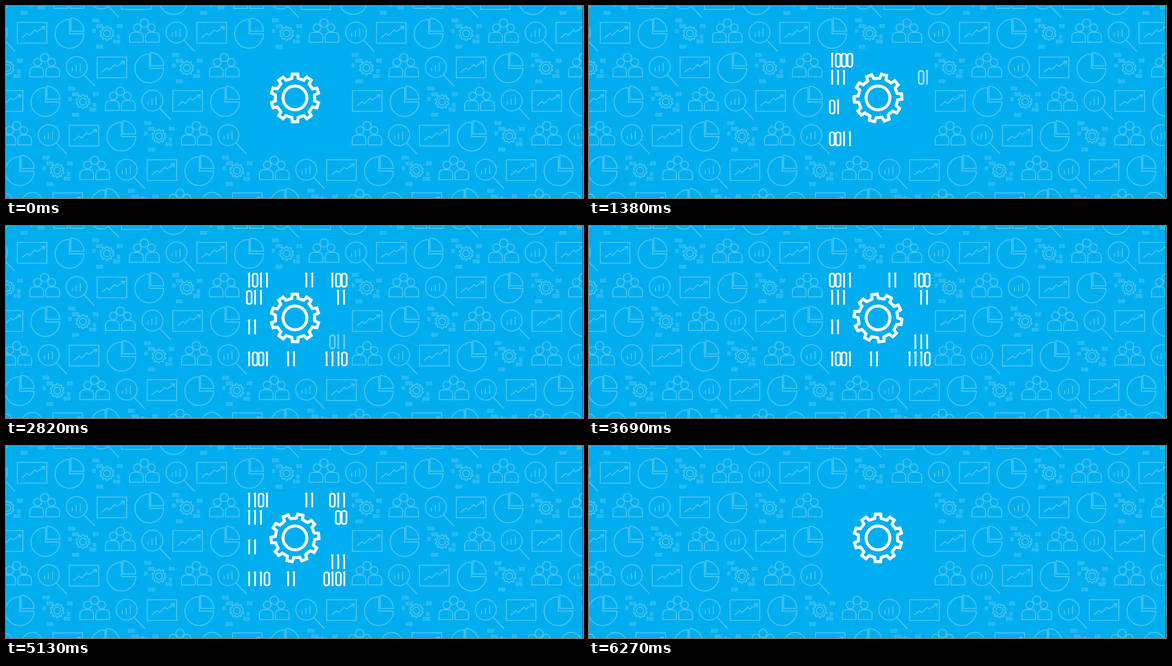
An HTML page with a canvas that plays this animation: 1200 by 400 pixels, repeating every 6300 ms.

```html
<!DOCTYPE html>
<html lang="en">
<head>
<meta charset="utf-8">
<title>Data gear</title>
<style>
html, body { margin: 0; width: 100%; height: 100%; overflow: hidden; background: #00aeef; }
canvas { display: block; }
</style>
</head>
<body>
<canvas id="stage" width="1200" height="400"></canvas>
<script>
const LOOP = 6300, STEP = 30;
const PERIOD = 373.5;
const stage = document.getElementById('stage');
const backdrop = document.createElement('canvas');
backdrop.width = 1200;
backdrop.height = 400;
let g = backdrop.getContext('2d');

function line(...pts) {
  g.beginPath();
  for (let i = 0; i < pts.length; i += 2) g.lineTo(pts[i], pts[i + 1]);
  g.stroke();
}

function circle(x, y, r) {
  g.beginPath();
  g.arc(x, y, r, 0, 2 * Math.PI);
  g.stroke();
}

// Ten tapered teeth around a ring; k scales the shape
function gear(x, y, k, width, turn) {
  g.save();
  g.translate(x, y);
  g.rotate(turn);
  g.lineWidth = width;
  g.beginPath();
  for (let i = 0; i < 10; i++) {
    for (const [a, r] of [[-9.4, 41.2], [-6.4, 50], [6.4, 50], [9.4, 41.2]]) {
      const angle = (i * 36 + a - 90) * Math.PI / 180;
      g.lineTo(r * k * Math.cos(angle), r * k * Math.sin(angle));
    }
  }
  g.closePath();
  g.stroke();
  circle(0, 0, 24.8 * k);
  g.restore();
}

// Binary digits: (x, y) is the top left corner
function digits(word, x, y, k = 1, pitch = 12.3, width = 3.5) {
  g.save();
  g.translate(x, y);
  g.scale(k, k);
  g.lineWidth = width;
  [...word].forEach((d, i) => {
    const c = 6.8 + i * pitch;
    if (d === '0') {
      g.beginPath();
      g.roundRect(c - 5, 1.8, 10, 27.2, 4.2);
      g.stroke();
    } else {
      line(c - 2.6, 2.6, c, 1.6, c, 30.6);
    }
  });
  g.restore();
}

function chart() {
  g.strokeRect(23.5, 34.3, 61.5, 43.2);
  line(33, 66, 44, 57, 49, 61, 60, 50, 64.5, 53.5, 80, 43.5);
  line(73, 43.5, 80.5, 43, 79, 50);
}

function pie() {
  g.beginPath();
  g.arc(132, 58, 30, 0, 1.5 * Math.PI);
  g.lineTo(132, 58);
  g.closePath();
  g.stroke();
  g.beginPath();
  g.moveTo(134.8, 52.5);
  g.arc(134.8, 52.5, 27.2, -Math.PI / 2, 0);
  g.closePath();
  g.stroke();
}

function dataGear() {
  gear(210, 57, .29, 1.9, 0);
  for (const [word, x, y] of [['0101', 180, 26], ['0101', 188, 38], ['01', 180, 48],
    ['010', 231, 38], ['01', 231, 60], ['0101', 224, 70], ['0101', 188, 81]]) {
    digits(word, x, y, .25, 14.8, 5);
  }
}

function people() {
  circle(287.8, 35.3, 8.6);
  for (const side of [-1, 1]) {
    circle(287.8 + side * 14.6, 45.3, 8);
    g.beginPath();
    g.roundRect(287.8 + side * 16.6 - 14.2, 55, 28.4, 20.5, [9, 9, 0, 0]);
    g.stroke();
  }
}

function magnifier() {
  circle(354.5, 55, 21.8);
  line(370, 71, 392, 94.5);
  line(345.5, 56, 345.5, 64);
  line(353.5, 51, 353.5, 64);
  line(362, 47, 362, 64);
}

function paintBackdrop() {
  g.fillStyle = '#00aeef';
  g.fillRect(0, 0, 1200, 400);
  g.strokeStyle = '#4fc6f4';
  const icons = [[chart, 54], [pie, 132], [dataGear, 210], [people, 288], [magnifier, 354]];
  // Offset of each row, and how far its right part moves in
  const rows = [[-157, -70.5], [0, 0], [166, 72], [-50, 142], [108, 214, 18.5], [270, 286], [74, 355]];
  rows.forEach(([dx, dy, inset = 0], row) => {
    for (let n = -2; n < 4; n++) {
      for (const [draw, center] of icons) {
        let shift = dx + n * PERIOD;
        if (center + shift > 600) shift -= inset;
        const x = center + shift;
        const cleared = row > 1 && row < 5 && x > 490 && x < 715;
        if (cleared || x < -60 || x > 1260) continue;
        g.save();
        g.translate(shift, dy);
        g.lineWidth = 2;
        draw();
        g.restore();
      }
    }
  });
  g.fillStyle = '#0b3a4c';
  g.fillRect(1199, 0, 1, 400);
}

// Groups in order of appearance: x, y, words to flicker through
const groups = [
  [499, 97.5, '0101 1110 1000 0011 1011 0110 1101'],
  [499, 133.5, '011 101 111 111 011 101 111'],
  [499, 195, '01 11 01 11 11 11 11'],
  [499, 261.5, '0101 1010 0011 1001 1001 0110 1110'],
  [684, 133.5, '01 11 01 11 11 01 00'],
  [672, 97.5, '110 011 100 100 100 101 011'],
  [660, 261.5, '0110 1001 1111 1110 1110 1011 0101'],
  [580, 261.5, '01 11 01 11 11 11 11'],
  [618, 97.5, '01 11 01 11 11 11 11'],
  [672, 226, '101 011 111 111 011 101 111']
].map(([x, y, words]) => ({ x, y, words: words.split(' ') }));

const clamp = v => Math.max(0, Math.min(1, v));

function paint(t) {
  g.drawImage(backdrop, 0, 0);
  g.strokeStyle = '#fff';
  // Two whole turns, reached on the last step
  gear(601, 191.5, 1, 6.2, t / (LOOP - STEP) * 4 * Math.PI);
  const fadeOut = clamp((6240 - t) / 300);
  groups.forEach(({ x, y, words }, i) => {
    g.globalAlpha = clamp((t - i * 300) / 300) * fadeOut;
    if (g.globalAlpha) digits(words[Math.floor(t / 150) % words.length], x, y);
  });
  g.globalAlpha = 1;
}

paintBackdrop();
g = stage.getContext('2d');
const start = performance.now();
function tick() {
  const t = (performance.now() - start) % LOOP;
  paint(Math.floor(t / STEP) * STEP);
  requestAnimationFrame(tick);
}
tick();
</script>
</body>
</html>
```
